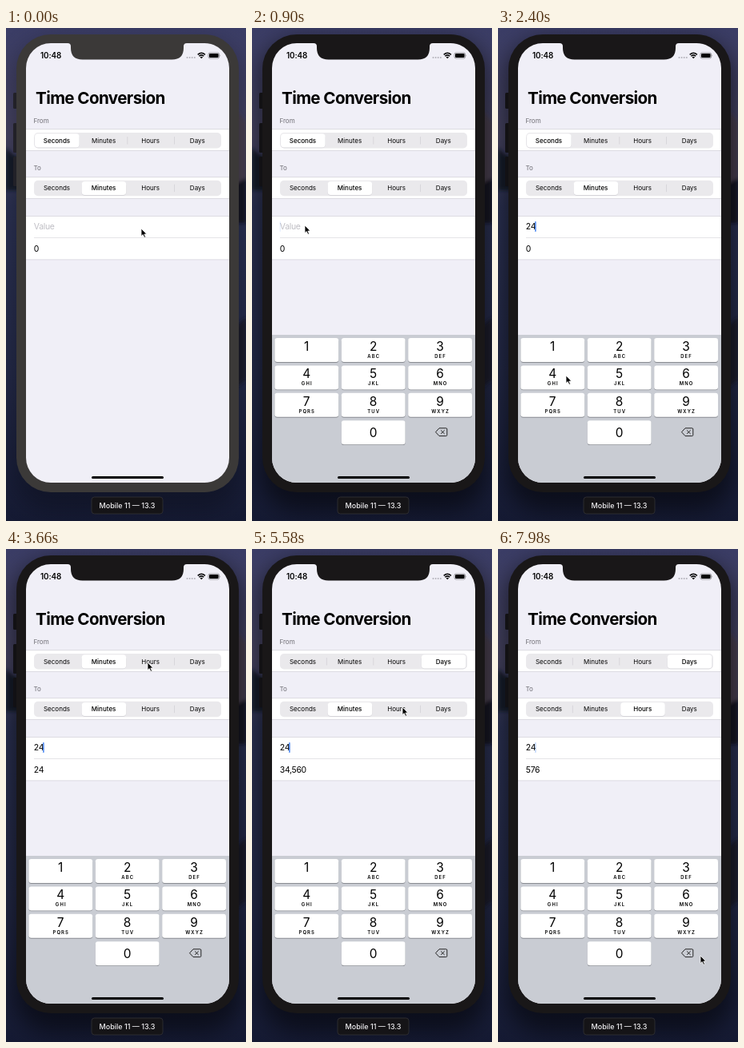
Animation of 300 by 617 pixels, one loop 8 s. Source, as an HTML page:

```html
<!DOCTYPE html>
<html lang="en">
<head>
<meta charset="utf-8">
<title>Time Conversion</title>
<style>
html, body { margin: 0; width: 100%; height: 100%; overflow: hidden; background: #11152a; }
svg { display: block; width: 300px; height: 617px; }
text { font-family: Inter, "Open Sans", sans-serif; fill: #000; }
.mid { text-anchor: middle; }
.title { font-size: 20.6px; font-weight: 700; letter-spacing: -.6px; }
.clock { font-size: 9.8px; font-weight: 600; letter-spacing: -.05px; }
.head { font-size: 8px; fill: #6f6e75; }
.seg { font-size: 8px; }
.value { font-size: 10.4px; letter-spacing: -.3px; }
.digit { font-size: 15.4px; }
.abc { font-size: 5.9px; font-weight: 600; letter-spacing: 1.15px; }
.tip { font-size: 9px; font-weight: 500; fill: #eeedf0; }
</style>
</head>
<body>
<svg id="stage" viewBox="0 0 300 617" xmlns="http://www.w3.org/2000/svg">
  <defs>
    <linearGradient id="sky" x2="0" y2="1">
      <stop offset="0" stop-color="#3b3d66"/>
      <stop offset=".22" stop-color="#45425f"/>
      <stop offset=".36" stop-color="#2b3152"/>
      <stop offset=".7" stop-color="#232947"/>
      <stop offset="1" stop-color="#151a33"/>
    </linearGradient>
    <filter id="soft" x="-40%" y="-20%" width="180%" height="140%"><feGaussianBlur stdDeviation="14"/></filter>
    <filter id="haze" x="-60%" y="-20%" width="220%" height="140%"><feGaussianBlur stdDeviation="2"/></filter>
    <clipPath id="screen"><rect x="25" y="19" width="254" height="550" rx="31"/></clipPath>
  </defs>

  <rect width="300" height="617" fill="url(#sky)"/>
  <g filter="url(#haze)">
    <path d="M0 150 L8 158 L20 164 V203 H0 Z" fill="#191a2a"/>
    <path d="M285 100 L292 108 L300 118 V196 H285 Z" fill="#4a4050"/>
    <path d="M285 196 L300 188 V244 H285 Z" fill="#171722"/>
    <path d="M285 375 L300 362 V440 L285 452 Z" fill="#1b1c2b"/>
  </g>
  <rect id="shadow" x="8" y="14" width="288" height="590" rx="50" filter="url(#soft)"/>

  <g id="buttons">
    <rect x="9" y="81" width="6" height="20" rx="1.5"/>
    <rect x="9" y="119" width="6" height="37" rx="1.5"/>
    <rect x="9" y="161" width="6" height="37" rx="1.5"/>
  </g>
  <rect id="bezel" x="13" y="8" width="278" height="573" rx="43"/>

  <g clip-path="url(#screen)">
    <rect x="25" y="19" width="254" height="550" fill="#f0eff7"/>
    <g id="form"></g>
    <g id="pad">
      <rect x="25" y="384" width="254" height="186" fill="#c9ccd3"/>
    </g>
    <rect x="107" y="561" width="90" height="3" rx="1.5"/>
  </g>
  <path id="notch" d="M77 18 V19 Q81 19 81 23 V25 Q81 39.500 95.500 39.500 H207.500 Q222 39.500 222 25 V23 Q222 19 226 19 V18 Z"/>

  <g fill="#b3b2ba">
    <circle cx="226.500" cy="37" r="1"/><circle cx="229.600" cy="37" r="1"/>
    <circle cx="232.700" cy="37" r="1"/><circle cx="235.800" cy="37" r="1"/>
  </g>
  <g fill="none" stroke="#000" stroke-width="1.500">
    <path d="M239.700 33.400 Q244.300 29.200 248.900 33.400"/>
    <path d="M241.300 35.200 Q244.300 32.500 247.300 35.200"/>
  </g>
  <path d="M242.500 36.400 Q244.300 35 246.100 36.400 L244.300 38.300 Z"/>
  <rect x="253" y="31" width="13.600" height="7" rx="2" fill="none" stroke="#77767c" stroke-width=".7"/>
  <rect x="254" y="32" width="11.600" height="5" rx="1.200"/>
  <path d="M267.400 33.200 Q268.500 34.500 267.400 35.800 Z" fill="#77767c"/>

  <rect x="107" y="587" width="89" height="21" rx="3.500" fill="#151417" stroke="#343337" stroke-width=".8"/>
  <text x="151.500" y="600.800" class="tip mid">Mobile 11 — 13.3</text>

  <path id="cursor" d="M0 0 V9.600 L2.200 7.600 L3.900 11.300 L5.500 10.600 L3.900 7 H6.900 Z"
    stroke="#fff" stroke-width=".8" stroke-linejoin="round"/>
</svg>

<script>
const $ = id => document.getElementById(id);
const LOOP = 8000, TICK = 60, STEP = 58.6;
const UNITS = [["Seconds", 1], ["Minutes", 60], ["Hours", 3600], ["Days", 86400]];

function add(parent, tag, attrs, text) {
  const el = document.createElementNS("http://www.w3.org/2000/svg", tag);
  for (const k in attrs) el.setAttribute(k, attrs[k]);
  if (text !== undefined) el.textContent = text;
  return parent.appendChild(el);
}
const rect = (parent, x, y, width, height, fill, rx = 0) =>
  add(parent, "rect", { x, y, width, height, fill, rx });
const label = (parent, x, y, cls, text) => add(parent, "text", { x, y, class: cls }, text);

const form = $("form"), pad = $("pad");

function row(y, h) {
  rect(form, 25, y, 254, h, "#fff");
  rect(form, 25, y - .6, 254, .7, "#d3d2d9");
  rect(form, 25, y + h, 254, .7, "#d3d2d9");
}

function segments(y) {
  rect(form, 35, y, 234, 19.5, "#eae9ec", 5);
  const seps = [1, 2, 3].map(i => rect(form, 34.3 + i * STEP, y + 5, .7, 9.5, "#cfced3"));
  const pill = add(form, "g", {});
  rect(pill, 35.8, y + 1.9, 56, 17.4, "#d4d3d8", 4.3);
  rect(pill, 36, y + 1.2, 55.6, 17.2, "#fff", 4);
  const names = UNITS.map(([name], i) => label(form, 63.5 + i * STEP, y + 12.6, "seg mid", name));
  return (pos, chosen) => {
    pill.setAttribute("transform", `translate(${pos * STEP} 0)`);
    seps.forEach((s, i) => s.setAttribute("opacity", pos > i - .4 && pos < i + 1.4 ? 0 : 1));
    names.forEach((n, i) => n.setAttribute("font-weight", i === chosen ? 500 : 400));
  };
}

label(form, 43, 38, "clock", "10:48");
label(form, 37, 95.2, "title", "Time Conversion");
label(form, 34.5, 118.5, "head", "From");
label(form, 34.5, 178, "head", "To");
row(127, 26.2);
row(187, 26.2);
row(235.6, 54);
rect(form, 35, 262, 244, .7, "#dad9df");
const showFrom = segments(131), showTo = segments(190.7);
const input = label(form, 34.8, 252, "value", "");
const result = label(form, 34.8, 279.6, "value", "");
const caret = rect(form, 34.6, 242, 1.4, 13, "#3478f0", .7);

const LETTERS = ["", "ABC", "DEF", "GHI", "JKL", "MNO", "PQRS", "TUV", "WXYZ"];
function key(n, col, line) {
  const x = 28.4 + col * 83.4, y = 388 + line * 34.4;
  rect(pad, x, y + .9, 79.8, 30, "#898c92", 3.2);
  const face = rect(pad, x, y, 79.8, 30, "#fff", 3.2);
  label(pad, x + 39.8, y + (n ? 15.9 : 20.4), "digit mid", n);
  if (n) label(pad, x + 40.4, y + 25, "abc mid", LETTERS[n - 1]);
  return face;
}
const keys = { 0: key(0, 1, 3) };
for (let n = 1; n < 10; n++) keys[n] = key(n, (n - 1) % 3, Math.floor((n - 1) / 3));
add(pad, "path", {
  d: "M229.500 505.700 L234 500.800 H242.500 Q243.800 500.800 243.800 502 V509.400 Q243.800 510.600 242.500 510.600 H234 Z" +
     "M236.200 503.500 L240.600 507.900 M240.600 503.500 L236.200 507.900",
  fill: "none", stroke: "#111", "stroke-width": .9, "stroke-linejoin": "round"
});

// time, x, y of the pointer
const PATH = [
  [0, 169, 251], [360, 66, 247], [1440, 66, 247], [1740, 158, 405],
  [1920, 158, 405], [2220, 85, 435], [2520, 85, 435], [2980, 125, 142],
  [3300, 125, 142], [3660, 177, 142], [4020, 177, 142], [4320, 239, 142],
  [5100, 239, 142], [5520, 188, 198], [5940, 188, 198], [6220, 181, 142],
  [6480, 181, 142], [6780, 243, 140], [7200, 243, 140], [7560, 259, 424],
  [7920, 253, 509], [8000, 253, 509]
];
// time, newly chosen segment
const FROM = [[0, 0], [3120, 1], [3900, 2], [4500, 3], [6300, 2], [6900, 3]];
const TO = [[0, 1], [5700, 2]];
const TYPED = [[0, ""], [1860, "2"], [2340, "24"]];
const PRESSES = [[1800, 2], [2280, 4]];

const clamp = v => Math.max(0, Math.min(1, v));
const smooth = v => (v = clamp(v), v * v * (3 - 2 * v));
const indexAt = (list, t) => list.reduce((n, e, i) => e[0] <= t ? i : n, 0);

function pointer(t) {
  const i = Math.min(indexAt(PATH, t), PATH.length - 2);
  const [t0, x0, y0] = PATH[i], [t1, x1, y1] = PATH[i + 1];
  const p = smooth((t - t0) / (t1 - t0));
  return [x0 + (x1 - x0) * p, y0 + (y1 - y0) * p];
}

function slide(list, t, show) {
  const i = indexAt(list, t), [start, now] = list[i];
  const before = i ? list[i - 1][1] : now;
  show(before + (now - before) * smooth((t - start) / 240), now);
  return UNITS[now][1];
}

function caretAlpha(t) {
  if (t < 660) return 0;
  if (t < 1800) return .55 + .45 * Math.cos((t - 420) / 950 * 2 * Math.PI);
  if (t < 2880) return 1;
  const gap = Math.abs((t - 5010 + 9500 + 475) % 950 - 475);
  return clamp((gap - 95) / 70);
}

function draw(t) {
  const active = t >= 180;
  $("bezel").setAttribute("fill", active ? "#191718" : "#3b3938");
  $("notch").setAttribute("fill", active ? "#191718" : "#3b3938");
  $("buttons").setAttribute("fill", active ? "#121114" : "#222128");
  $("shadow").setAttribute("opacity", active ? .5 : .25);

  const text = TYPED[indexAt(TYPED, t)][1];
  input.textContent = text || "Value";
  input.style.fill = text ? "#000" : "#bfbec4";
  caret.setAttribute("x", 34.6 + [0, 6, 11.6][text.length]);
  caret.setAttribute("opacity", caretAlpha(t));

  const from = slide(FROM, t, showFrom), to = slide(TO, t, showTo);
  result.textContent = Math.floor(Number(text) * from / to).toLocaleString("en-US");

  const rise = 1 - (1 - clamp((t - 560) / 340)) ** 3;
  pad.setAttribute("transform", `translate(0 ${186 * (1 - rise)})`);
  for (const [at, n] of PRESSES)
    keys[n].setAttribute("fill", t >= at && t < at + 100 ? "#b3b8c1" : "#fff");

  $("cursor").setAttribute("transform", `translate(${pointer(t)})`);
}

function frame() {
  const t = performance.now() % LOOP;
  draw(Math.floor(t / TICK) * TICK);
  requestAnimationFrame(frame);
}
frame();
</script>
</body>
</html>
```
